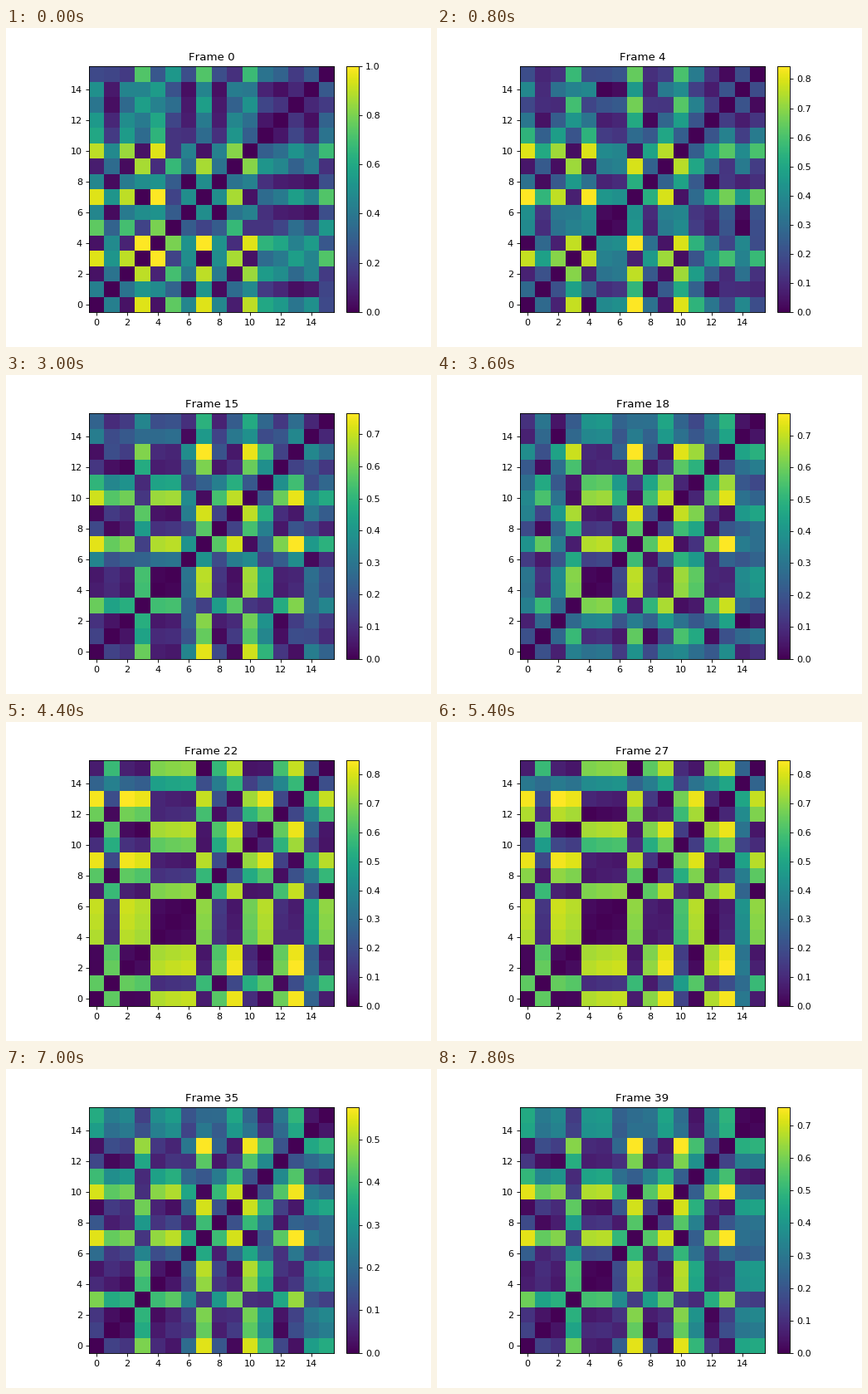
Recreate the animation shown at these times as a matplotlib script. Size 512 by 384 pixels, loop 8 s.

```python
import numpy as np
import matplotlib.pyplot as plt
from matplotlib.animation import FuncAnimation
from mpl_toolkits.axes_grid1 import make_axes_locatable

FRAMES = 40
INTERVAL = 200
NODES = 16

plt.rcParams["text.kerning_factor"] = 6

# Four poses of the nodes on a line; each cell shows the distance of a pair.
START = [.05, .48, .10, 1, 0, .80, .51, 1, .51, .13, .95, .65, .59, .44, .55, .27]
OPEN = [.03, .18, .14, .62, .09, .08, .41, .768, .20, .05, .735, .53, .15, 0, .32, .21]
SPLIT = [.84, .20, .85, .825, .09, .075, .065, .775,
         .21, .015, .73, .825, .18, 0, .57, .775]
CLOSE = [.009, 0, .031, .09, .105, 0, .105, .031, .122, 0, 0, .09, .1355, 0, 0, .129]


def pose(levels, speed=None, age=0):
    """Node positions after the given nodes drift at a steady speed."""
    x = np.array(levels)
    for node, rate in (speed or {}).items():
        x[node] += rate * age
    return x


def open_pose(step):
    return pose(OPEN, {6: -.005, 7: -.0004, 10: .0007, 14: .005, 15: .009}, step - 8)


def split_pose(step):
    return pose(SPLIT, {8: -.014, 10: -.012, 12: -.018, 14: -.014}, step - 22)


KEYS = {
    0: pose(START),
    8: open_pose(8),
    15: open_pose(15),
    22: split_pose(22),
    27: split_pose(27),
    30: split_pose(27),
    32: pose(CLOSE),
    36: open_pose(36),
    39: open_pose(39),
}


def distances(step):
    times = list(KEYS)
    paths = np.array(list(KEYS.values())).T
    x = np.array([np.interp(step, times, path) for path in paths])
    return np.abs(x[:, None] - x)


fig, ax = plt.subplots(figsize=(6.4, 4.8), dpi=80)
cax = make_axes_locatable(ax).append_axes("right", size="5%", pad="5%")
image = ax.imshow(distances(0), cmap="viridis", origin="lower",
                  interpolation="nearest")
ax.set_xticks(range(0, NODES, 2))
ax.set_yticks(range(0, NODES, 2))
title = ax.set_title("Frame 0")
fig.colorbar(image, cax=cax)


def update(step):
    grid = distances(step)
    image.set_data(grid)
    image.set_clim(0, grid.max())
    title.set_text(f"Frame {step}")
    return image, title


anim = FuncAnimation(fig, update, frames=FRAMES, interval=INTERVAL,
                     repeat=True, repeat_delay=0, blit=False)
plt.show()
```
